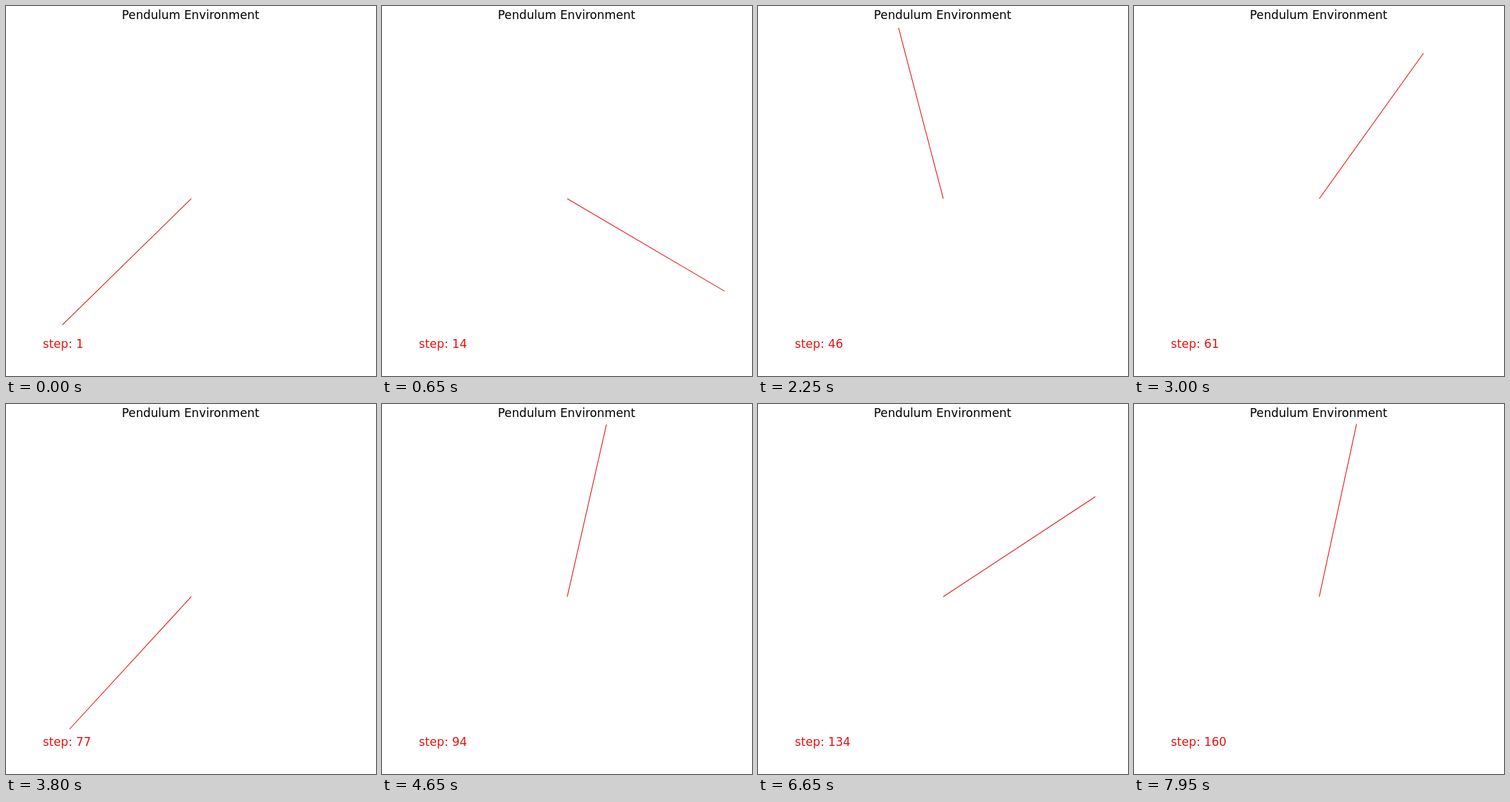
An HTML page that plays this animation: 540 px wide and 540 px high, repeating every 8000 ms.

```html
<!DOCTYPE html>
<html lang="en">
<head>
<meta charset="utf-8">
<title>Pendulum Environment</title>
<style>
  html, body { margin: 0; width: 100%; height: 100%; overflow: hidden; background: #fff; }
  svg { display: block; width: 100vw; height: 100vh; }
  text { font-family: "DejaVu Sans", sans-serif; font-size: 17.2px; }
</style>
</head>
<body>
<svg viewBox="0 0 540 540">
  <text x="269.4" y="19" text-anchor="middle">Pendulum Environment</text>
  <line id="rod" stroke="#e81212" stroke-width="1.1"/>
  <text id="label" x="53.8" y="499" fill="#e81212"></text>
</svg>
<script>
const LOOP = 8000, STEP = 50;
const CX = 270.4, CY = 281.2, RX = 269.6, RY = 257;
const GRAVITY = 33; // degrees by which the fall runs ahead of the even phase
const rad = deg => deg * Math.PI / 180;
const rod = document.getElementById("rod");
const label = document.getElementById("label");

// [step, phase]: one swing up to the right, then turns over the top
const keys = [
  [1, -28.5], [22, 70], [27, 50.5], [46, -149], [69, -299],
  [77, -386.5], [112, -757.1], [134, -988.4], [160, -1286.2]
];
const last = keys.length - 2;

// Starts from rest and keeps its speed at the end
function slope(i) {
  if (i < 0) return 0;
  const [s0, p0] = keys[Math.min(i, last)], [s1, p1] = keys[Math.min(i, last) + 1];
  return (p1 - p0) / (s1 - s0);
}

// Harmonic mean, zero where the swing turns back
function tangent(i) {
  const a = slope(i - 1), b = slope(i);
  return a * b > 0 ? 2 * a * b / (a + b) : 0;
}

function phase(step) {
  let i = 0;
  while (i < last && step > keys[i + 1][0]) i++;
  const [s0, p0] = keys[i], [s1, p1] = keys[i + 1];
  const h = s1 - s0, u = (step - s0) / h, v = 1 - u;
  return v * v * (1 + 2 * u) * p0 + u * u * (1 + 2 * v) * p1
    + h * u * v * (v * tangent(i) - u * tangent(i + 1));
}

// Fast through the bottom, slow over the top
function angle(step) {
  const p = phase(step);
  return rad(p + GRAVITY * Math.sin(rad(p)));
}

function draw(ms) {
  const step = Math.floor((ms % LOOP) / STEP) + 1;
  const a = angle(step);
  rod.setAttribute("x2", (CX + RX * Math.sin(a)).toFixed(2));
  rod.setAttribute("y2", (CY + RY * Math.cos(a)).toFixed(2));
  label.textContent = "step: " + step;
}

let start;
function tick(now) {
  start ??= now;
  draw(now - start);
  requestAnimationFrame(tick);
}
rod.setAttribute("x1", CX);
rod.setAttribute("y1", CY);
draw(0);
requestAnimationFrame(tick);
</script>
</body>
</html>
```
